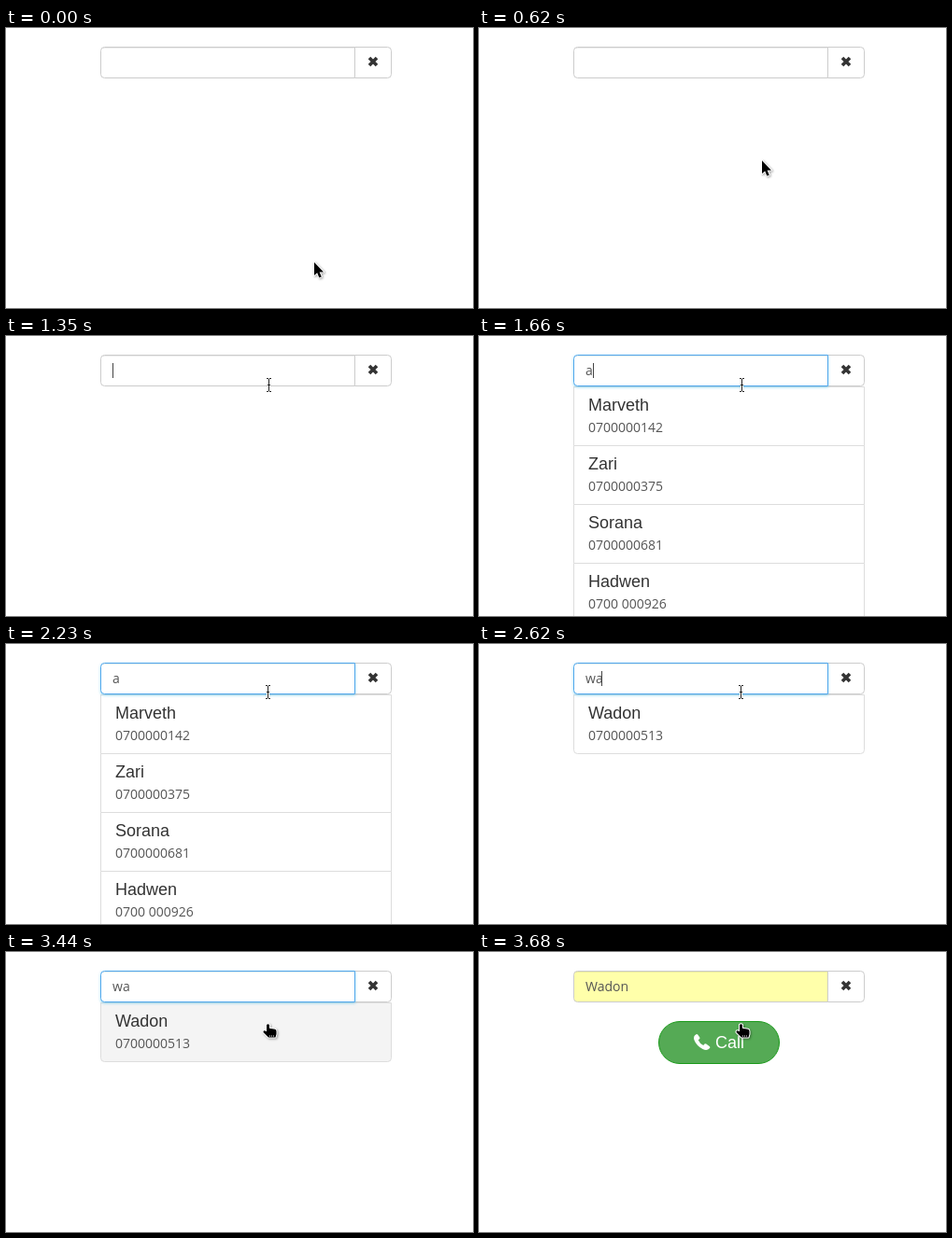
An HTML page that plays this animation: 500 px wide and 300 px high, repeating every 5.8 s.

```html
<!DOCTYPE html>
<html lang="en">
<head>
<meta charset="utf-8">
<title>Contact search</title>
<style>
  html, body { margin: 0; width: 100%; height: 100%; overflow: hidden; background: #fff; }
  svg { display: block; width: 500px; height: 300px; }
  text { white-space: pre; }
  .body { font: 14px "Open Sans", "Noto Sans", sans-serif; fill: #555; }
  .name { font: 18px "Liberation Sans", Arial, sans-serif; fill: #333; }
  .item { fill: #fff; stroke: #ddd; }
  .halo { stroke: #fff; stroke-width: 2; paint-order: stroke; stroke-linejoin: round;
          filter: drop-shadow(1px 1px 1px rgba(0, 0, 0, .35)); }
</style>
</head>
<body>
<svg viewBox="0 0 500 300">
  <g id="list"></g>

  <path d="M373.5 20.5H408.5a4 4 0 0 1 4 4V49.5a4 4 0 0 1 -4 4H373.5Z" fill="#fff" stroke="#ccc"/>
  <path d="M389 32L397 40M397 32L389 40" stroke="#333" stroke-width="3.6"/>

  <path id="box" d="M373.5 20.5H105.5a4 4 0 0 0 -4 4V49.5a4 4 0 0 0 4 4H373.5Z"/>
  <path d="M104 21.5H373" stroke="#000" stroke-opacity=".07"/>
  <text id="value" class="body" x="114" y="42"></text>
  <rect id="caret" y="29" width="1" height="16" fill="#444"/>

  <g id="call">
    <rect x="192.5" y="74.5" width="129" height="45" rx="22.5" fill="#5a5" stroke="#1a9a1a"/>
    <path fill="#fff" d="M232.5 88.2Q229.2 90 230.3 94Q232.8 100.500 239.500 104Q244 106.200 246.800 103.300Q248 102 247 101.200L243.300 98.400Q242.300 97.800 241.500 98.600L240.200 100Q236.200 98 234.700 94.300L236 93.300Q236.800 92.500 236.300 91.600L234.200 88.500Q233.500 87.600 232.500 88.200Z"/>
    <text class="name" x="253" y="103" style="fill:#fff">Call</text>
  </g>

  <g id="arrow" class="halo"><path d="M0 0V14L3.2 11.2L5.3 16.4L7.800 15.400L5.600 10.400H10Z"/></g>
  <g id="beam">
    <path d="M-2 -7H2M0 -7V7M-2 7H2" fill="none" stroke="#fff" stroke-width="3" stroke-linecap="square"/>
    <path d="M-2.500 -7H-.5M.5 -7H2.500M0 -6.500V6.500M-2.500 7H-.5M.5 7H2.500M-1.500 0H1.500" fill="none" stroke="#222"/>
  </g>
  <g id="hand" class="halo">
    <path d="M-1.500 .5Q0 -1.200 1.500 .5V4.300L7.500 5.200Q9 5.600 9 7.500V10.500L8 14H.5L-5 8.500Q-5.300 6.500 -3.500 6.700L-1.500 7.800Z"/>
    <path d="M1.500 12.500H7.500" stroke="#fff" stroke-dasharray="1 1" fill="none" style="stroke-width:1"/>
  </g>
</svg>
<script>
const LOOP = 5800;
const $ = id => document.getElementById(id);

const people = [
  ["Marveth", "0700000142"],
  ["Zari", "0700000375"],
  ["Sorana", "0700000681"],
  ["Hadwen", "0700 000926"],
  ["Wadon", "0700000513"]
];

// time, field text, caret x (0 = hidden), people listed
const states = [
  [0, "", 0, []],
  [1350, "", 114, []],
  [1660, "a", 122, [0, 1, 2, 3, 4]],
  [2230, "a", 0, [0, 1, 2, 3, 4]],
  [2400, "", 114, []],
  [2540, "w", 124, [3, 4]],
  [2620, "wa", 131, [4]],
  [3200, "wa", 0, [4]],
  [3640, people[4][0], 0, []]
];

// time, pointer shape, x, y
const pointer = [
  [0, "arrow", 330, 251],
  [40, "arrow", 330, 249],
  [210, "arrow", 329, 249],
  ...glide(),
  [980, "beam", 281, 53],
  [1030, "beam", 281, 52],
  [1960, "beam", 280, 52],
  [2000, "beam", 280, 51],
  [3200, "beam", 280, 53],
  [3240, "hand", 280, 59],
  [3280, "hand", 280, 66],
  [3320, "hand", 280, 72],
  [3360, "hand", 280, 76],
  [3440, "hand", 280, 77]
];

function glide() {
  return Array.from({ length: 15 }, (_, i) => {
    const p = 1 - (1 - (i + 1) / 15) ** 1.25;
    const x = Math.round(329 - 47 * p), y = Math.round(249 - 196 * p);
    return [380 + 40 * i, y < 54 ? "beam" : "arrow", x, y];
  });
}

const at = (table, t) => table.findLast(row => row[0] <= t);

function item([name, phone], i, count, hover) {
  const top = 54.5 + 63 * i, r = i === count - 1 ? 4 : 0;
  const d = `M101.5 ${top}H412.5v${63 - r}a${r} ${r} 0 0 1 ${-r} ${r}H${101.5 + r}a${r} ${r} 0 0 1 ${-r} ${-r}Z`;
  return `<path class="item" d="${d}"${hover ? ' style="fill:#f4f4f4"' : ""}/>` +
    `<text class="name" x="117" y="${80 + 63 * i}">${name}</text>` +
    `<text class="body" x="117" y="${103 + 63 * i}">${phone}</text>`;
}

function focusAt(t) {
  if (t < 1350 || t >= 3680) return 0;
  if (t >= 3640) return 0.5;
  const p = Math.min(1, Math.floor((t - 1350) / 40) / 4);
  return p * (2 - p);
}

let listed = "";
function draw(t) {
  const [, value, caret, rows] = at(states, t);
  const [, shape, x, y] = at(pointer, t);
  const focus = focusAt(t), done = t >= 3640, hover = shape === "hand";

  const key = rows + "|" + hover;
  if (key !== listed) {
    listed = key;
    $("list").innerHTML = rows.map((p, i) => item(people[p], i, rows.length, hover)).join("");
  }

  const mix = (a, b) => Math.round(a + (b - a) * focus);
  const box = $("box").style;
  box.fill = done ? "#ffa" : "#fff";
  box.stroke = `rgb(${mix(204, 82)},${mix(204, 168)},${mix(204, 236)})`;
  box.filter = focus ? `drop-shadow(0 1px 1.5px rgba(82,195,236,${0.6 * focus}))` : "none";

  $("value").textContent = value;
  $("caret").setAttribute("x", caret);
  $("caret").style.display = caret ? "" : "none";
  $("call").style.display = done ? "" : "none";

  for (const id of ["arrow", "beam", "hand"]) {
    const half = id === "arrow" ? 0 : 0.5;
    $(id).style.display = id === shape ? "" : "none";
    $(id).setAttribute("transform", `translate(${x + half} ${y + half})`);
  }
}

const start = performance.now();
function tick() {
  draw((performance.now() - start) % LOOP);
  requestAnimationFrame(tick);
}
tick();
</script>
</body>
</html>
```
